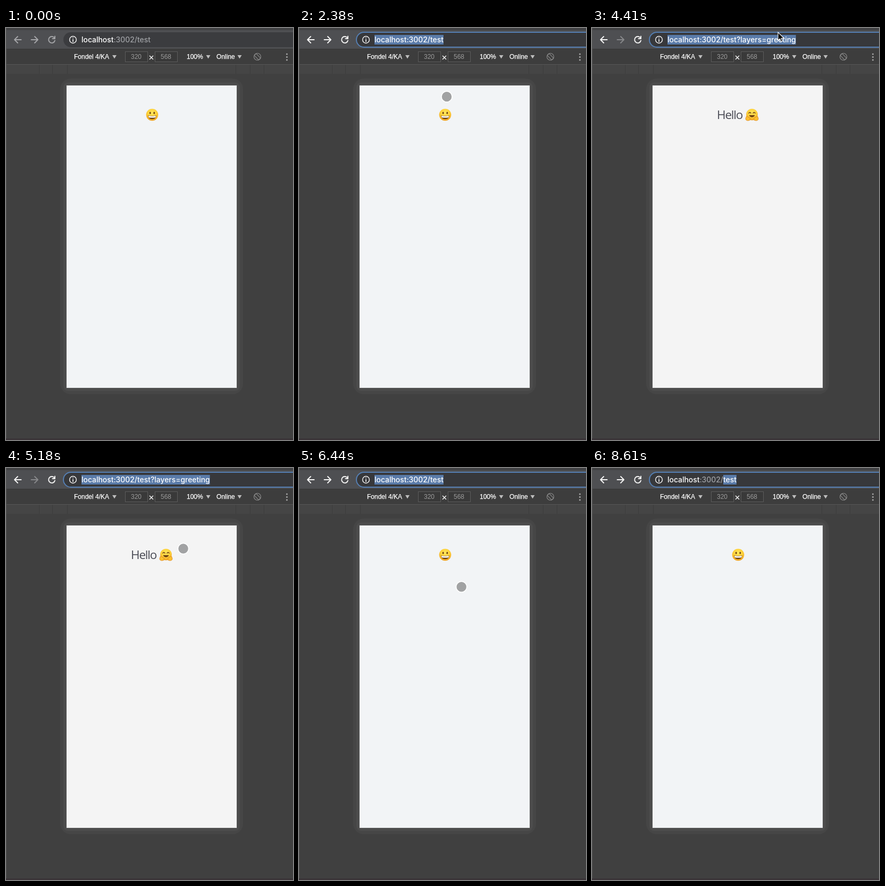
Recreate the animation shown at these times as an HTML page. Size 540 px wide and 774 px high, loop 8750 ms.

```html
<!DOCTYPE html>
<html lang="en">
<head>
<meta charset="utf-8">
<title>Layer navigation</title>
<style>
  html, body { margin: 0; width: 100%; height: 100%; overflow: hidden; background: #404040; }
  svg { display: block; width: 540px; height: 774px; }
  .line { fill: none; stroke-linecap: round; stroke-linejoin: round; }
  .address { font: 500 13.9px Inter, sans-serif; }
  .device { font: 12px "Liberation Sans", Arial, sans-serif; fill: #fff; stroke: #fff; stroke-width: .25; }
  .device .size { fill: #9b9b9b; stroke: none; }
  .hello { font: 22.5px "Open Sans", sans-serif; letter-spacing: -1.2px; fill: #4a4b55; }
</style>
</head>
<body>
<svg viewBox="0 0 540 774">
  <defs>
    <radialGradient id="skin" cx=".5" cy=".35" r=".65">
      <stop offset="0" stop-color="#ffe75c"/>
      <stop offset=".6" stop-color="#fdd03a"/>
      <stop offset="1" stop-color="#ee9c1c"/>
    </radialGradient>
    <clipPath id="screen"><rect x="114" y="108" width="320" height="568"/></clipPath>
    <path id="beamShape" class="line" d="M-3.5-8.5q3.5 0 3.5 2.5v12q0 2.5-3.5 2.5M3.5-8.5Q0-8.5 0-6M0 6q0 2.5 3.5 2.5M-2.5 2.5h5"/>
    <path id="triangle" d="M-4-3h8l-4 6.5z" fill="#bdbdbd" stroke="none"/>
  </defs>

  <!-- browser toolbar -->
  <rect width="540" height="774" fill="#404040"/>
  <rect width="540" height="40" fill="#4e4f52"/>
  <rect width="540" height="4" fill="#414244"/>
  <rect id="pill" x="108" y="8" width="460" height="28" rx="14" stroke-width="2"/>
  <g class="line" stroke-width="1.9">
    <path class="icon" d="M28.5 22H16m6-6-6 6 6 6"/>
    <path id="forward" d="M47.500 22H60m-6-6 6 6-6 6"/>
    <path class="icon" d="M91 18.500A6 6 0 1 0 92 23.500M92 15.500V20h-4.500"/>
    <path d="M126 21.500v4M126 18.500v.1" stroke="#eee" stroke-width="1.7"/>
    <circle cx="126" cy="22" r="6.400" stroke="#eee" stroke-width="1.500"/>
  </g>
  <rect id="selection" y="13" height="18" fill="#5a7ba9"/>
  <text id="address" class="address" x="142" y="27"><tspan fill="#fff">localhost</tspan><tspan id="path"></tspan><tspan id="tail"></tspan></text>

  <!-- device bar and rulers -->
  <rect y="40" width="540" height="28" fill="#3d3d3d"/>
  <path d="M0 39.500h540" stroke="#383838"/>
  <path d="M0 68.500h540" stroke="#575757"/>
  <rect y="69" width="540" height="17" fill="#454545"/>
  <path d="M62.500 69v17M87.500 69v17M115.500 69v17M432.500 69v17M459.500 69v17M485.500 69v17" stroke="#3c3c3c"/>
  <g fill="#393939" stroke="#5c5c5c">
    <rect x="224.500" y="44.500" width="42" height="19"/>
    <rect x="280.500" y="44.500" width="42" height="19"/>
  </g>
  <g class="device">
    <text x="128" y="58">Fondel 4/KA</text>
    <text x="340" y="58">100%</text>
    <text x="396" y="58">Online</text>
    <text class="size" x="235" y="58">320</text>
    <text class="size" x="291" y="58">568</text>
    <use href="#triangle" x="204" y="54"/>
    <use href="#triangle" x="380.500" y="54"/>
    <use href="#triangle" x="439.500" y="54"/>
  </g>
  <path d="m270 52 7 7m0-7-7 7" stroke="#f0f0f0" stroke-width="1.500"/>
  <g class="line" stroke="#8e8e8e" stroke-width="1.100" transform="translate(473 54) rotate(-45)">
    <circle r="6.500"/>
    <rect x="-2.500" y="-6" width="5" height="12" rx="1"/>
  </g>
  <g fill="#a3a3a3">
    <circle cx="528.500" cy="49" r="1.600"/>
    <circle cx="528.500" cy="54.500" r="1.600"/>
    <circle cx="528.500" cy="60" r="1.600"/>
  </g>

  <!-- device frame -->
  <rect x="102" y="95" width="344" height="593" rx="20" fill="#464646"/>
  <rect x="108" y="102" width="332" height="580" rx="9" fill="#4c4c4c"/>
  <rect x="113.500" y="107.500" width="321" height="569" fill="none" stroke="#5b5b5b"/>
  <rect id="page" x="114" y="108" width="320" height="568"/>
  <rect width="1" height="774" fill="#525252"/>
  <rect y="771" width="540" height="3" fill="#3a3438"/>

  <g id="smile" transform="translate(275 163)">
    <circle r="11.300" fill="url(#skin)"/>
    <g fill="#6b3f12">
      <ellipse cx="-3.800" cy="-3.300" rx="1.400" ry="2.100"/>
      <ellipse cx="3.800" cy="-3.300" rx="1.400" ry="2.100"/>
      <path d="M-7.800 1.300Q0 3 7.800 1.300 7 8.300 0 8.300T-7.800 1.300z"/>
    </g>
    <path d="M-7 2Q0 3.500 7 2 6.800 4.800 5.800 5.200 0 6-5.800 5.200-6.800 4.800-7 2z" fill="#fff"/>
  </g>
  <g id="hello">
    <text class="hello" x="235" y="171">Hello</text>
    <g transform="translate(301 162.500)">
      <circle r="10.800" fill="url(#skin)"/>
      <g class="line" stroke="#6b3f12" stroke-width="1.500">
        <path d="M-6-2.500q2-3 4 0M2-2.500q2-3 4 0"/>
        <path d="M-4.500 2Q0 7 4.500 2z" fill="#6b3f12"/>
      </g>
      <g fill="#fbc02f" stroke="#dc8420" stroke-width=".8">
        <path id="hand" d="M-10.500 3.500q1.500-1 2.500 1l4 1.500q1.500 1-.5 2l1 1q0 2.500-4 2.500-4.500 0-4.500-4z"/>
        <use href="#hand" transform="scale(-1 1)"/>
      </g>
    </g>
  </g>

  <g clip-path="url(#screen)">
    <g id="swipe">
      <circle r="70" fill="#a5a6a7"/>
      <path class="line" d="M52.500 0H18M34-16 18 0l16 16" stroke="#fff" stroke-width="9"/>
    </g>
  </g>

  <g id="cursor">
    <g id="ring">
      <circle r="15.500" fill="#1b1c1e" fill-opacity=".6" stroke="#000" stroke-width="3"/>
      <circle r="13.500" fill="none" stroke="#fff" stroke-width="2"/>
    </g>
    <g id="beam">
      <use href="#beamShape" stroke="#222" stroke-width="3.200"/>
      <use href="#beamShape" stroke="#fff" stroke-width="1.300"/>
    </g>
    <path id="arrow" d="M0 0v15.500l3.500-3.200 2.300 5.400 2.600-1.100-2.300-5.300h5z" fill="#000" stroke="#fff" stroke-width="1.100"/>
    <circle id="touch" r="10" fill="#a1a2a3" stroke="#fff" stroke-width="1.500"/>
  </g>
</svg>
<script>
const LOOP = 8750, STEP = 70;
const el = id => document.getElementById(id);
const set = (node, attrs) => { for (const k in attrs) node.setAttribute(k, attrs[k]); };
const show = (id, on) => set(el(id), { display: on ? "inline" : "none" });
const within = (t, a, b) => t >= a && t < b;
const clamp = v => Math.min(1, Math.max(0, v));

// Pointer tracks: [time, x, y]
const tracks = [
  [[630, 395, 165], [770, 383, 330], [910, 340, 399], [1120, 288, 341], [1190, 288, 341], [1330, 275, 143], [1400, 275, 143]],
  [[1540, 263, 5], [1610, 271, 28], [2240, 271, 28], [2520, 285, 230], [2730, 291, 348], [2940, 300, 315.5],
   [3640, 300, 315.5], [3990, 160, 24], [4270, 372, 24], [4410, 350, 8], [4550, 348, 24], [4830, 348, 24],
   [5460, 322, 253.5], [6300, 322, 253.5], [6720, 273, 163], [7140, 259, 23], [7770, 259, 23], [8610, 480, 800]]
];
const clicks = [[2100, 2240], [7280, 7420], [7560, 7700]];

function pointerAt(t) {
  const track = tracks.find(k => within(t, k[0][0], k[k.length - 1][0]));
  if (!track) return null;
  const i = track.findIndex(k => k[0] > t);
  const [t0, x0, y0] = track[i - 1], [t1, x1, y1] = track[i];
  const p = (t - t0) / (t1 - t0);
  return [x0 + (x1 - x0) * p, y0 + (y1 - y0) * p];
}

function drawPointer(t) {
  const at = pointerAt(t);
  show("cursor", at);
  if (!at) return;
  const [x, y] = at;
  const touch = x > 114 && x < 434 && y > 108 && y < 676;
  const beam = y > 10 && y < 38 && x > 130;
  set(el("cursor"), { transform: `translate(${x} ${y})` });
  show("touch", touch);
  show("beam", beam);
  show("arrow", !touch && !beam);
  show("ring", clicks.some(c => within(t, ...c)));
}

function drawSwipe(t) {
  const back = t > 5000;
  const [start, peak, end, reach] = back ? [5740, 5950, 6230, 45] : [2940, 3290, 3500, 35];
  const active = within(t, start, end);
  show("swipe", active);
  if (!active) return;
  const rise = clamp((t - start) / (peak - start));
  const out = reach * (1 - (1 - rise) ** 2);
  const x = back ? 44 + out : 504 - out;
  set(el("swipe"), {
    transform: `translate(${x} 391.5) scale(${back ? 1 : -1} 1)`,
    opacity: (back ? 1 : .84) * (1 - clamp((t - peak) / (end - peak)))
  });
}

function drawAddress(t) {
  const focused = t >= 2100;
  const greeting = within(t, 3220, 5880);
  const all = within(t, 2100, 7490), word = t >= 7630;
  const dim = "#9fa1a5";
  el("path").textContent = ":3002/";
  el("tail").textContent = greeting ? "test?layers=greeting" : "test";
  set(el("path"), { fill: all ? "#fff" : dim });
  set(el("tail"), { fill: all || word ? "#fff" : dim });
  set(el("pill"), { fill: focused ? "#37383b" : "#3b3c3f", stroke: focused ? "#557fb3" : "none" });
  const iconColor = focused ? "#f4f4f4" : "#a4a5a8";
  document.querySelectorAll(".icon").forEach(node => set(node, { stroke: iconColor }));
  set(el("forward"), { stroke: greeting ? "#87888b" : iconColor });

  show("selection", all || word);
  const text = el("address");
  const x = text.getStartPositionOfChar(word ? 15 : 0).x;
  const end = text.getEndPositionOfChar(text.getNumberOfChars() - 1).x;
  set(el("selection"), { x, width: end - x });
}

function draw(now) {
  const t = Math.floor(now % LOOP / STEP) * STEP;
  const hello = within(t, 3360, 5880);
  show("hello", hello);
  show("smile", !hello);
  set(el("page"), { fill: hello ? "#f4f4f4" : "#f2f4f6" });
  drawAddress(t);
  drawSwipe(t);
  drawPointer(t);
}

let origin;
function frame(now) {
  origin ??= now;
  draw(now - origin);
  requestAnimationFrame(frame);
}
draw(0);
requestAnimationFrame(frame);
</script>
</body>
</html>
```
